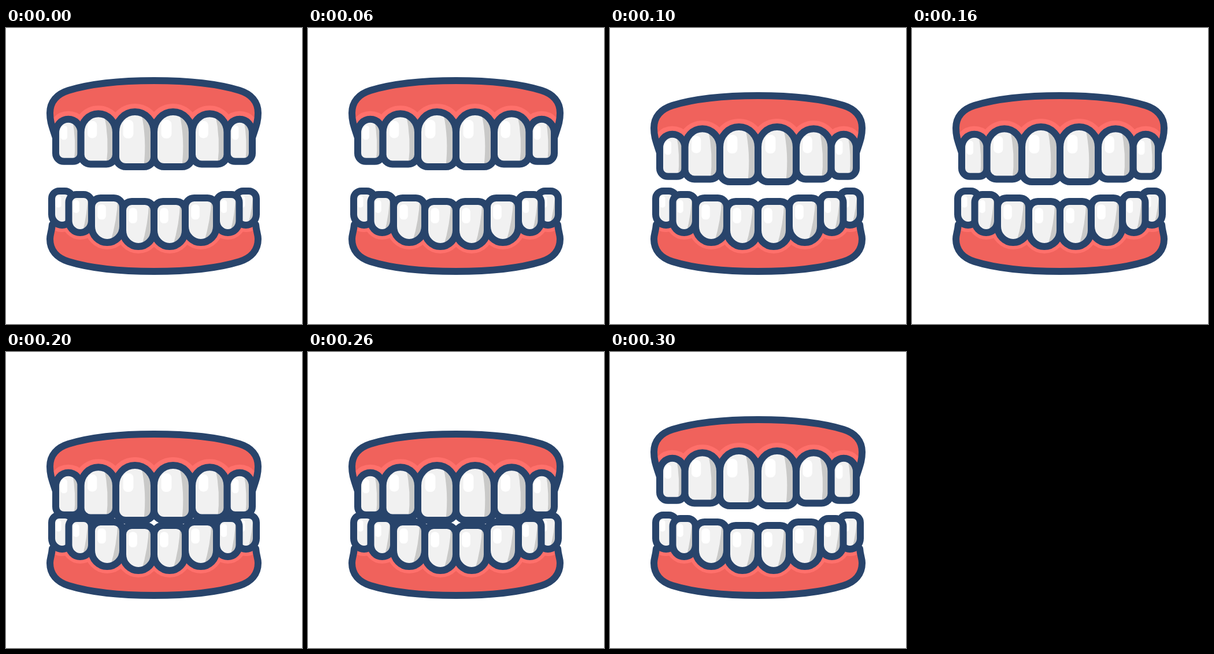
These frames come from a looping animation (512 px wide and 512 px high, 0.4 s). An HTML page:

```html
<!DOCTYPE html>
<html lang="en">
<head>
<meta charset="utf-8">
<title>Chattering teeth</title>
<style>
  html, body { margin: 0; width: 100%; height: 100%; overflow: hidden; background: #fff; }
  svg { display: block; width: 100vw; height: 100vh; }
  .line { fill: none; stroke: #28446b; stroke-width: 12; stroke-linecap: round; stroke-linejoin: round; }
  .gum { fill: #f0625c; }
  .rim { fill: none; stroke: #ff706b; }
  .enamel { fill: #f1f1f1; }
  .shade { fill: #c9c9c8; }
  .shine { fill: #fff; }
  #upper { animation: bite 400ms step-end infinite; }
  @keyframes bite {
    0%, 100% { transform: translateY(0); }
    25%, 75% { transform: translateY(26px); }
    50% { transform: translateY(51px); }
  }
</style>
</head>
<body>
<svg viewBox="0 0 512 512">
  <g id="lower"></g>
  <g id="upper"></g>
</svg>
<script>
const CENTER = 256;
const cornerRadius = w => 8 + 0.14 * w;

// Teeth are counted from the middle outwards; i = 0 is a front tooth.
const upper = {
  name: 'upper',
  count: 3,
  rimWidth: 28,
  shadeEdge: [0.66, 0.82, 0.73],
  gum: { root: [170, 190], side: 147, corner: 108, edge: 91 },
  width: i => 66 - 5.6 * i * i,
  top: i => 145 + 3.2 * i * i,
  bottom: i => 240 - 4.6 * i,
  radii: w => [w / 2, w * 0.53, cornerRadius(w), cornerRadius(w)]
};

const lower = {
  name: 'lower',
  count: 4,
  rimWidth: 24,
  shadeEdge: [0.84, 0.82, 0.6],
  gum: { root: [176, 340], side: 365, corner: 404, edge: 421 },
  width: i => [54, 54, 39.5, 29.5][i],
  top: i => 300 - 6 * i,
  bottom: i => [378, 371, 354, 341][i],
  radii: w => [cornerRadius(w), cornerRadius(w), w / 2, w * 0.52]
};

// The narrowest teeth tuck behind their neighbours. Back teeth come first.
function layOut(jaw) {
  const teeth = [];
  let reach = 0;
  for (let i = 0; i < jaw.count; i++) {
    reach += jaw.width(i);
    const w = Math.max(jaw.width(i), 36);
    const y = jaw.top(i);
    const h = jaw.bottom(i) - y;
    teeth.unshift({ x: CENTER - reach, y, w, h }, { x: CENTER + reach - w, y, w, h });
  }
  return teeth;
}

function outline({ x, y, w, h }, radii) {
  const [tx, ty, bx, by] = radii(w);
  const r = x + w, b = y + h;
  return `M${x} ${y + ty}A${tx} ${ty} 0 0 1 ${x + tx} ${y}H${r - tx}` +
    `A${tx} ${ty} 0 0 1 ${r} ${y + ty}V${b - by}` +
    `A${bx} ${by} 0 0 1 ${r - bx} ${b}H${x + bx}` +
    `A${bx} ${by} 0 0 1 ${x} ${b - by}Z`;
}

function gumLine({ root: [rootX, rootY], side, corner, edge }) {
  const at = (dx, y) => `${CENTER + dx} ${y} `;
  const bend = (side + corner) / 2;
  const shoulder = corner + (side - corner) * 0.16;
  const slope = corner + (edge - corner) * 0.67;
  return 'M' + at(-rootX, rootY) +
    'C' + at(-177, (rootY + side) / 2) + at(-180, (rootY + 2 * side) / 3) + at(-180, side) +
    'C' + at(-180, bend) + at(-168, shoulder) + at(-148, corner) +
    'C' + at(-111, slope) + at(-56, edge) + at(0, edge) +
    'C' + at(56, edge) + at(111, slope) + at(148, corner) +
    'C' + at(168, shoulder) + at(180, bend) + at(180, side) +
    'C' + at(180, (rootY + 2 * side) / 3) + at(177, (rootY + side) / 2) + at(rootX, rootY);
}

function shade({ x, y, w, h }, edge) {
  const [top, middle, bottom] = edge.map(part => x + part * w);
  return `M${top} ${y}Q${middle} ${y + h / 2} ${bottom} ${y + h}H${x + w}V${y}Z`;
}

const shine = ({ x, y, w, h }) =>
  `<rect class="shine" x="${x + 0.19 * w}" y="${y + 0.145 * h}"
    width="${0.27 * w}" height="${0.34 * h}" rx="${0.12 * w}"/>`;

const path = (cls, d, extra = '') => `<path class="${cls}" d="${d}" ${extra}/>`;
const clipped = (id, d, content) =>
  `<clipPath id="${id}"><path d="${d}"/></clipPath><g clip-path="url(#${id})">${content}</g>`;

function drawJaw(jaw) {
  const teeth = layOut(jaw);
  const shapes = teeth.map(tooth => outline(tooth, jaw.radii));
  const gum = gumLine(jaw.gum);
  const rims = shapes.map(d => path('rim', d, `stroke-width="${jaw.rimWidth}"`)).join('');

  const drawTooth = (tooth, i) => path('enamel', shapes[i]) +
    clipped(`${jaw.name}-${i}`, shapes[i], path('shade', shade(tooth, jaw.shadeEdge)) + shine(tooth)) +
    path('line', shapes[i]);

  document.getElementById(jaw.name).innerHTML =
    path('gum', gum) + clipped(`${jaw.name}-gum`, gum, rims) +
    path('line', gum) + teeth.map(drawTooth).join('');
}

[lower, upper].forEach(drawJaw);
</script>
</body>
</html>
```
